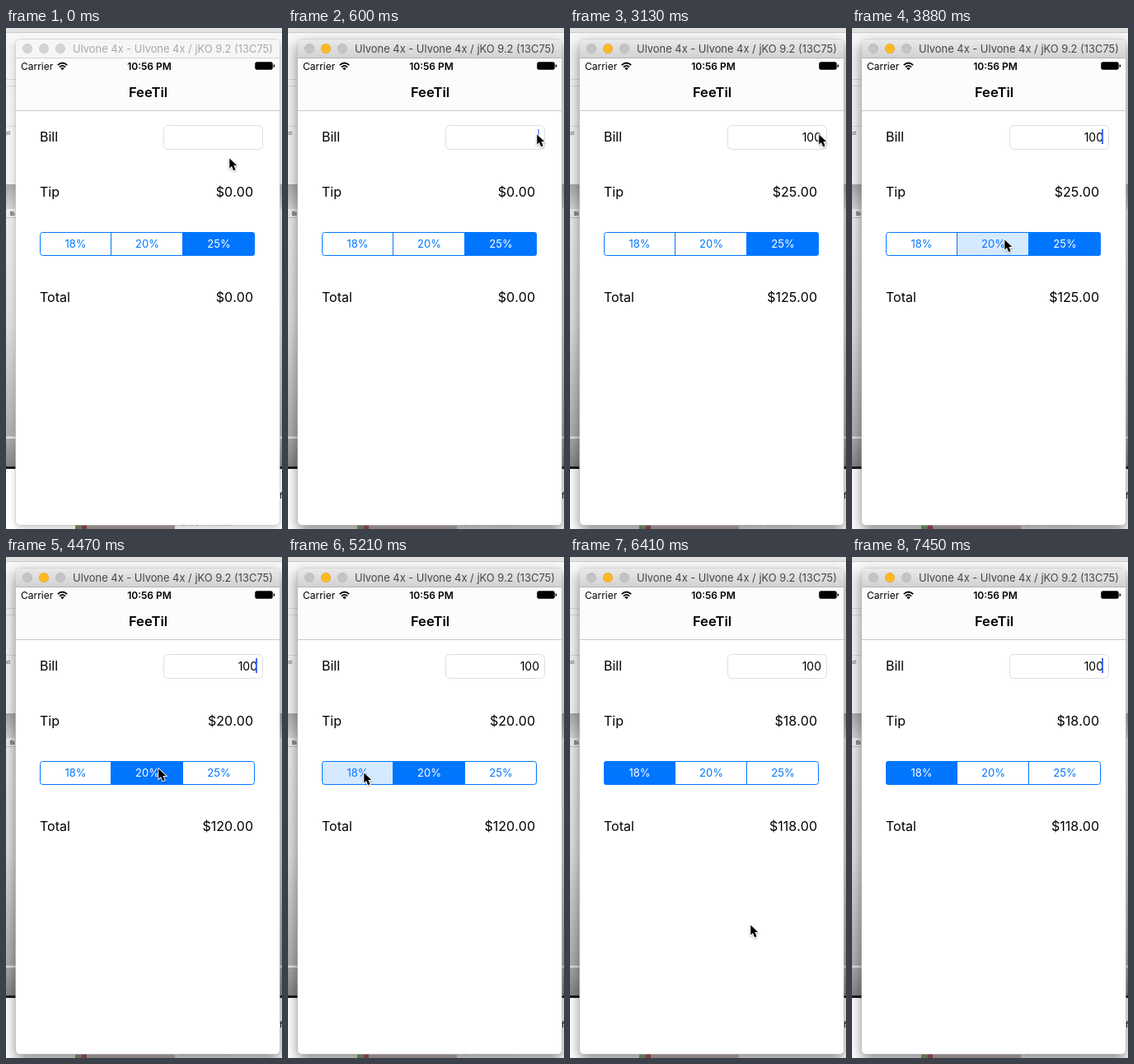
Animation of 335 by 609 pixels, one loop 7.6 s. Source, as an HTML page:

```html
<!DOCTYPE html>
<html lang="en">
<head>
<meta charset="utf-8">
<title>Tip calculator</title>
<style>
  html, body { margin: 0; width: 100%; height: 100%; overflow: hidden; background: #fff; }
  svg { display: block; width: 335px; height: 609px; font: 16px Inter, "Open Sans", sans-serif; }
  .small { font-size: 12px; }
  .end { text-anchor: end; font-kerning: none; }
  .mid { text-anchor: middle; }
  #shadow { filter: drop-shadow(0 4px 4px rgba(0,0,0,.2)); }
  .active #shadow { filter: drop-shadow(0 7px 8px rgba(0,0,0,.48)); }
  #bar { fill: #f6f6f6; }
  .active #bar { fill: url(#barFill); }
  #barLine { fill: #d4d4d4; }
  .active #barLine { fill: #b4b4b4; }
  #title { font-size: 12.9px; fill: #a9a9a9; }
  .active #title { fill: #474747; }
  .light { fill: #d3d3d3; stroke: #c8c8c8; stroke-width: .6; }
  .active .light { fill: #c4c4c4; stroke: #b2b2b2; }
  .active .light.amber { fill: #fdb924; stroke: #e0a028; }
  .segment rect { fill: #fff; }
  .segment text { font-size: 13px; fill: #0076ff; }
  .segment.pressed rect { fill: #d6eaff; }
  .segment.selected rect { fill: #0076ff; }
  .segment.selected text { fill: #fff; }
  #pointer { filter: drop-shadow(0 1px 1px rgba(0,0,0,.3)); }
</style>
</head>
<body>
<svg id="stage" viewBox="0 0 335 609">
  <defs>
    <linearGradient id="barFill" x2="0" y2="1">
      <stop stop-color="#e9e9e9"/><stop offset="1" stop-color="#d1d1d1"/>
    </linearGradient>
    <linearGradient id="desk" x2="0" y2="1">
      <stop stop-color="#ececec"/><stop offset=".5" stop-color="#dedede"/><stop offset="1" stop-color="#acacac"/>
    </linearGradient>
    <linearGradient id="dark" x2="0" y2="1">
      <stop stop-color="#aaa"/><stop offset="1" stop-color="#d4d4d4"/>
    </linearGradient>
    <linearGradient id="dock" x2="0" y2="1">
      <stop stop-color="#a8a8a8"/><stop offset="1" stop-color="#848484"/>
    </linearGradient>
    <clipPath id="segmentClip"><rect x="41" y="248" width="261" height="29" rx="3.5"/></clipPath>
  </defs>

  <!-- desktop behind the window -->
  <rect width="335" height="609" fill="#fff"/>
  <rect width="335" height="5" fill="#e2e2e2"/>
  <path d="M0 5.5H335" stroke="#c9c9c9"/>
  <rect y="6" width="335" height="13" fill="#f7f7f7"/>
  <rect y="19" width="335" height="171" fill="#f3f3f3"/>
  <path d="M0 62.5H12M0 70.5H12M0 119.5H12" stroke="#d8d8d8"/>
  <rect y="190" width="335" height="30" fill="url(#dark)"/>
  <rect y="220" width="335" height="278" fill="url(#desk)"/>
  <path d="M0 230.5H12" stroke="#c4c4c4"/>
  <path d="M0 497.5H335" stroke="#dcdcdc" stroke-width="2"/>
  <rect y="499" width="335" height="35" fill="url(#dock)"/>
  <rect y="533" width="335" height="3" fill="#1c1c1c"/>
  <g font-size="6" fill="#444"><text y="130">st</text><text x="5" y="228" font-weight="700">Bi</text></g>
  <text x="332" y="572" font-size="10">f</text>

  <rect id="shadow" x="12" y="14" width="320" height="590" rx="5" fill="#fff"/>

  <!-- photo peeking out below -->
  <rect x="84" y="603" width="121" height="6" fill="#8d8583"/>
  <rect x="84" y="603" width="8" height="6" fill="#5f7654"/>
  <rect x="92" y="603" width="6" height="6" fill="#793b48"/>
  <text x="212" y="605" font-size="10" fill="#666">2105 Minutes</text>

  <!-- window -->
  <rect x="11.5" y="13.5" width="321" height="591" rx="5.5" fill="#fff" stroke="#000" stroke-opacity=".12"/>
  <path id="bar" d="M12 37V19a5 5 0 0 1 5-5H327a5 5 0 0 1 5 5V37z"/>
  <rect id="barLine" x="12" y="36" width="320" height="1"/>
  <circle class="light" cx="26" cy="25" r="5.7"/>
  <circle class="light amber" cx="46" cy="25" r="5.7"/>
  <circle class="light" cx="66" cy="25" r="5.7"/>
  <text id="title" class="mid" x="202.5" y="30">Ulvone 4x - Ulvone 4x / jKO 9.2 (13C75)</text>

  <!-- status and navigation bars -->
  <rect x="12" y="37" width="320" height="63" fill="#fcfcfc"/>
  <path d="M12 100.5H332" stroke="#c8c8c8"/>
  <text class="small" x="18" y="50.5">Carrier</text>
  <path d="M62.8 45.2Q68.5 39.8 74.2 45.2M65 47.6Q68.5 44.2 72 47.6" fill="none" stroke="#000" stroke-width="1.8"/>
  <path d="M66.3 49Q68.5 47 70.7 49L68.5 51.2z"/>
  <text class="small mid" x="174" y="50.5" font-weight="600">10:56 PM</text>
  <rect x="302.5" y="41.5" width="21" height="9" rx="2" stroke="#000" stroke-opacity=".5"/>
  <path d="M324.6 44.3a1.8 1.8 0 0 1 0 3.6z"/>
  <text class="mid" x="172.5" y="84" font-size="16.6" font-weight="600">FeeTil</text>

  <!-- form -->
  <text x="41" y="138">Bill</text>
  <text x="41" y="205">Tip</text>
  <text x="41" y="333">Total</text>
  <rect x="191.5" y="118.5" width="120" height="29" rx="5" fill="#fff" stroke="#dedede"/>
  <text id="bill" class="end" x="305" y="137.5" font-size="14"></text>
  <rect id="caret" x="303" y="123" width="2" height="18" fill="#426bf2"/>
  <text id="tip" class="end" x="300" y="205"></text>
  <text id="total" class="end" x="300" y="333"></text>
  <g id="segments" clip-path="url(#segmentClip)"></g>
  <path d="M127.5 248V277M214.5 248V277" stroke="#0076ff"/>
  <rect x="41.5" y="248.5" width="260" height="28" rx="3" fill="none" stroke="#0076ff"/>

  <path id="pointer" d="M.3 .5V12.6L3 10 5.2 15.2 7.6 14.2 5.4 9.1H9.2z" stroke="#fff" stroke-width="1.8" paint-order="stroke"/>
</svg>
<script>
const LOOP = 7600, TICKS = 51;
const RATES = [18, 20, 25];
const byId = id => document.getElementById(id);

byId('segments').innerHTML = RATES.map((rate, i) =>
  `<g class="segment"><rect x="${41 + 87 * i}" y="248" width="87" height="29"/>` +
  `<text class="mid" x="${84.5 + 87 * i}" y="267">${rate}%</text></g>`).join('');
const segments = [...document.querySelectorAll('.segment')];

const pointerPath = [
  [0, 271, 158], [2, 302, 129], [22, 302, 129], [25, 185, 257],
  [31, 185, 257], [34, 92, 262], [39, 92, 262], [46, 301, 567]
];
const caretGaps = [[0, 4], [10, 11], [21, 23], [28, 30], [35, 37], [41, 44], [47, 50]];

function pointerAt(tick) {
  const next = pointerPath.findIndex(key => key[0] > tick);
  if (next < 0) return pointerPath.at(-1).slice(1);
  const [t0, x0, y0] = pointerPath[next - 1], [t1, x1, y1] = pointerPath[next];
  const u = (tick - t0) / (t1 - t0), eased = u * u * (3 - 2 * u);
  return [x0 + (x1 - x0) * eased, y0 + (y1 - y0) * eased].map(Math.round);
}

function caretOpacity(tick) {
  if (caretGaps.some(([from, to]) => tick >= from && tick < to)) return 0;
  return tick === 4 || caretGaps.some(([from]) => tick === from - 1) ? 0.6 : 1;
}

function render(tick) {
  const bill = tick < 11 ? '' : tick < 14 ? '1' : tick < 16 ? '10' : '100';
  const selected = tick < 27 ? 2 : tick < 36 ? 1 : 0;
  const pressed = { 26: 1, 35: 0 }[tick];
  const tip = bill * RATES[selected] / 100;

  byId('stage').classList.toggle('active', tick >= 3);
  byId('bill').textContent = bill;
  byId('tip').textContent = '$' + tip.toFixed(2);
  byId('total').textContent = '$' + (+bill + tip).toFixed(2);
  byId('caret').setAttribute('opacity', caretOpacity(tick));
  segments.forEach((segment, i) => {
    segment.classList.toggle('selected', i === selected);
    segment.classList.toggle('pressed', i === pressed);
  });
  byId('pointer').setAttribute('transform', `translate(${pointerAt(tick)})`);
  byId('pointer').setAttribute('opacity', tick < 47 ? 1 : 0);
}

const start = performance.now();
function frame() {
  const time = (performance.now() - start) % LOOP;
  render(Math.min(TICKS - 1, Math.floor((time + 8) * TICKS / LOOP)));
  requestAnimationFrame(frame);
}
frame();
</script>
</body>
</html>
```
